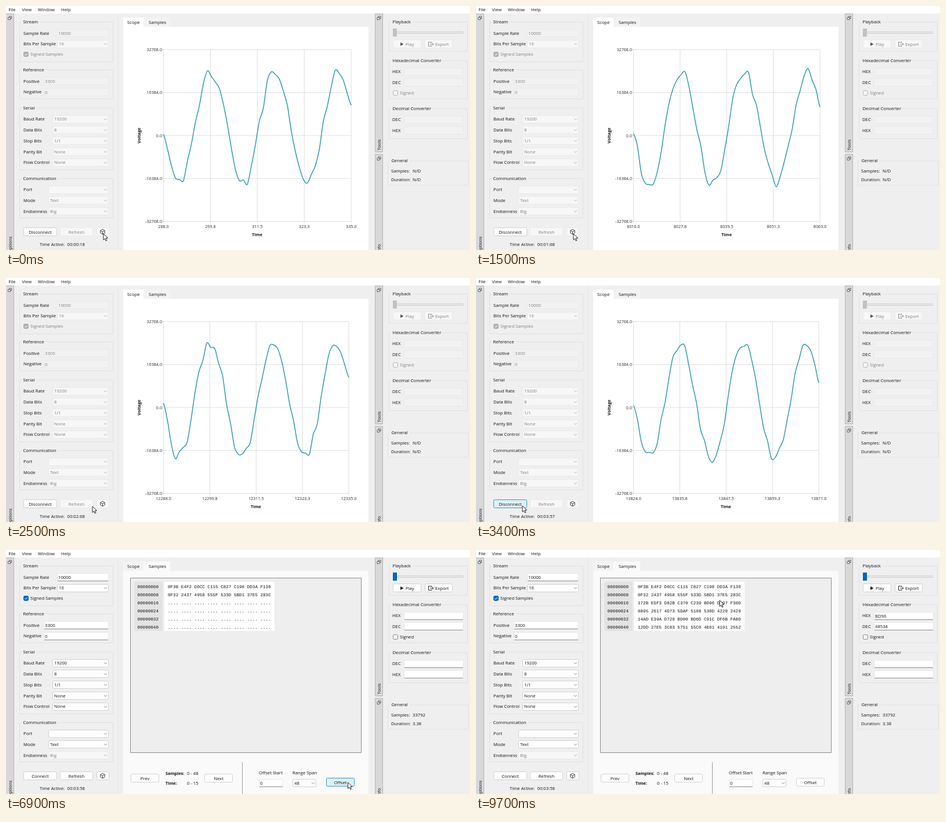
Animation, 800 px wide and 422 px high, one loop 9800 ms. Source, as an HTML page with a canvas:

```html
<!DOCTYPE html>
<html lang="en">
<head>
<meta charset="utf-8">
<title>Signal scope</title>
<style>
html, body { margin: 0; width: 100%; height: 100%; overflow: hidden; background: #efefef; }
canvas { display: block; }
</style>
</head>
<body>
<canvas id="stage" width="800" height="422"></canvas>
<script>
const g = document.getElementById('stage').getContext('2d');
const LOOP = 9800, STOP = 3500, SAMPLES_TAB = 4200, SPAN = 5600, OFFSET = 6600, LOADED = 7000, CONVERT = 8300;
const UI = '"Open Sans", "Noto Sans", sans-serif', MONO = '"Liberation Mono", monospace';
const BACK = '#efefef', INK = '#141414', DIM = '#808080', ACCENT = '#0067c0';

// time, x, y of the pointer tip
const POINTER = [[1900, 168, 394], [2500, 149, 395], [3300, 80, 394], [3800, 80, 394], [4000, 258, 29],
  [4300, 258, 29], [4800, 520, 404], [5900, 520, 404], [6500, 589.5, 402], [7000, 589.5, 402],
  [7600, 366, 90], [8500, 404, 88], [9700, 420, 87]];
// time, first sample on the scope
const START = [[0, 288], [1500, 8016], [2500, 12288], [3400, 13824]];

const HEX = [
  '0F3B E4F2 D6CC C115 C827 C198 DD3A F136',
  '0F32 2437 4958 555F 533D 5BD1 37E5 283C',
  '172B E5F3 D82B C370 C239 BD96 DD97 F30D',
  '0895 2617 4D73 5DAF 5168 530D 4220 2420',
  '14AD E39A D729 BD00 BD6D C91C DF6B FA8D',
  '12DD 27E5 3C83 5751 55C0 4E61 4191 2552'];

let live, mouse;

function at(keys, t) {
  let i = 1;
  while (i < keys.length - 1 && keys[i][0] < t) i++;
  const a = keys[i - 1], b = keys[i];
  const k = Math.min(1, Math.max(0, (t - a[0]) / (b[0] - a[0])));
  return a.slice(1).map((v, j) => v + (b[j + 1] - v) * k);
}

function random(seed) {
  return () => (seed = (seed * 16807 + 11) % 2147483647) / 2147483647;
}

function text(s, x, cy, { color = INK, size = 7.7, align = 'left', weight = 400, font = UI } = {}) {
  g.font = `${weight} ${size}px ${font}`;
  g.fillStyle = color;
  g.textAlign = align;
  g.fillText(s, x, cy + size * .355);
}

function upright(s, x, y, opts) {
  g.save();
  g.translate(x, y);
  g.rotate(-Math.PI / 2);
  text(s, 0, 0, opts);
  g.restore();
}

function fill(x, y, w, h, color) {
  g.fillStyle = color;
  g.fillRect(x, y, w, h);
}

function line(points, color, width = 1) {
  g.beginPath();
  points.forEach(([x, y]) => g.lineTo(x, y));
  g.strokeStyle = color;
  g.lineWidth = width;
  g.stroke();
}

function frame(x, y, w, h, color, width = 1) {
  g.strokeStyle = color;
  g.lineWidth = width;
  g.strokeRect(x, y, w, h);
}

function box(x, y, w, h, color, border, r = 2) {
  g.beginPath();
  g.roundRect(x + .5, y + .5, w - 1, h - 1, r);
  g.fillStyle = color;
  g.fill();
  g.strokeStyle = border;
  g.lineWidth = 1;
  g.stroke();
}

function group(title, x, y, w, h) {
  frame(x + .5, y + .5, w, h, '#e1e1e1');
  g.font = `7.7px ${UI}`;
  fill(x + 4, y - 2, g.measureText(title).width + 5, 5, BACK);
  text(title, x + 6.5, y);
}

function field(s, x, cy, w, on = !live) {
  cy = Math.round(cy);
  box(x, cy - 7, w, 14, on ? '#fff' : '#f2f2f2', on ? '#e6e6e6' : '#e9e9e9');
  if (on) fill(x + 1, cy + 6, w - 2, 1, '#8a8a8a');
  text(s, x + 2, cy, { color: on ? INK : DIM });
}

function hovered(x, y, w, h) {
  return mouse[0] >= x && mouse[0] <= x + w && mouse[1] >= y && mouse[1] <= y + h;
}

// fill and border of a clickable control
function skin(on, x, y, w, h) {
  if (!on) return ['#f7f7f7', '#eaeaea'];
  return hovered(x, y, w, h) ? ['#e0f0f8', '#3b93bf'] : ['#fdfdfd', '#d2d2d2'];
}

function combo(s, x, cy, w, on = !live) {
  const y = Math.round(cy) - 7, r = x + w - 5.5;
  box(x, y, w, 14, ...skin(on, x, y, w, 14));
  text(s, x + 3, cy, { color: on ? INK : DIM });
  line([[r - 2.5, cy - 1], [r, cy + 1.5], [r + 2.5, cy - 1]], on ? '#666' : '#a0a0a0', .8);
}

function button(s, x, cy, w, on = true, tx = x + w / 2, align = 'center') {
  const y = Math.floor(cy - 7.5);
  box(x, y, w, 15, ...skin(on, x, y, w, 15));
  text(s, tx, cy, { color: on ? INK : DIM, align });
}

function check(s, x, cy, ticked) {
  const tone = live ? '#b0b0b0' : ticked ? ACCENT : '#858585';
  box(x, cy - 4.5, 9, 9, ticked ? tone : '#f6f6f6', tone);
  if (ticked) line([[x + 2.2, cy], [x + 4, cy + 1.8], [x + 7, cy - 1.6]], '#fff');
  text(s, x + 12, cy, { color: live ? DIM : INK });
}

function dock(x, y, w, h, name, ty) {
  const cx = x + w / 2;
  fill(x, y, w, h, '#d8d8d8');
  frame(x + .5, y + .5, w - 1, h, '#b4b4b4');
  frame(cx - 1, y + 5, 4, 3.5, '#444', .8);
  fill(cx - 3, y + 7, 4, 3.5, '#eee');
  frame(cx - 3, y + 7, 4, 3.5, '#444', .8);
  upright(name, cx + .5, ty);
}

function cube(x, y) {
  const corner = i => [x + 4.3 * Math.sin(i * Math.PI / 3), y - 4.3 * Math.cos(i * Math.PI / 3)];
  line([0, 1, 2, 3, 4, 5, 6].map(corner), '#333', .9);
  [1, 3, 5].forEach(i => line([[x, y], corner(i)], '#333', .9));
}

function leftPanel(t) {
  dock(-1, 13, 15, 410, 'Options', 427);
  group('Stream', 23, 27, 161, 69);
  text('Sample Rate', 30, 47);
  field('10000', 88, 47, 89);
  text('Bits Per Sample', 30, 65.5);
  combo('16', 88, 65.5, 89);
  check('Signed Samples', 30, 83.5, true);

  group('Reference', 23, 110, 161, 50);
  text('Positive', 30, 130);
  field('3300', 65, 130, 112);
  text('Negative', 30, 148.5);
  field('0', 65, 148.5, 112);

  group('Serial', 23, 176, 161, 107);
  ['Baud Rate:19200', 'Data Bits:8', 'Stop Bits:1/1', 'Parity Bit:None', 'Flow Control:None'].forEach((row, i) => {
    const [name, v] = row.split(':'), y = 195.5 + i * 18.8;
    text(name, 30, y);
    combo(v, 80, y, 97);
  });

  group('Communication', 23, 298, 161, 68);
  ['Port:', 'Mode:Text', 'Endianness:Big'].forEach((row, i) => {
    const [name, v] = row.split(':'), y = 317.5 + i * 18.7;
    text(name, 30, y);
    combo(v, 73, y, 104, !live && i < 2);
  });

  button(live ? 'Disconnect' : 'Connect', 30, 391, 58);
  button('Refresh', 93, 391, 57, !live);
  button('', 156, 391, 22, !live);
  cube(166.5, 390.5);

  const ticks = Math.min(358, Math.round(18 + t * .0998));
  const two = n => String(n).padStart(2, '0');
  text('Time Active:', 58, 412);
  text(`00:${two(ticks / 100 | 0)}:${two(ticks % 100)}`, 105.5, 412);
}

function rightPanel(t) {
  dock(636, 13, 14, 239, 'Tools', 249.5);
  dock(636, 256, 14, 170, 'Info', 426);
  const tone = live ? DIM : INK;

  group('Playback', 660, 27, 135, 51);
  box(667, 44, 122, 4, '#e6e6e6', '#d2d2d2', 1);
  fill(667, 39, 7, 14, live ? '#c2c2c2' : ACCENT);
  button('Play', 667, 66, 49, !live, 689, 'left');
  g.fillStyle = live ? '#555' : INK;
  g.beginPath();
  g.moveTo(680, 63);
  g.lineTo(685.5, 66);
  g.lineTo(680, 69);
  g.fill();
  button('Export', 722, 66, 48, !live, 740, 'left');
  line([[734, 64], [734, 62.5], [728.5, 62.5], [728.5, 69.5], [734, 69.5], [734, 68]], tone, .9);
  line([[731, 66], [737, 66]], tone, .9);
  line([[735.3, 64.3], [737, 66], [735.3, 67.7]], tone, .9);

  const done = t >= CONVERT;
  const entry = (name, v, y) => {
    text(name, 666, y);
    field(v, 686, y, 103);
  };
  group('Hexadecimal Converter', 660, 94, 135, 66);
  entry('HEX', done ? 'BD96' : '', 113.5);
  entry('DEC', done ? '48534' : '', 132);
  check('Signed', 667, 150.5, false);
  group('Decimal Converter', 660, 177, 135, 52);
  entry('DEC', '', 196.5);
  entry('HEX', '', 215);

  group('General', 658, 267.5, 139, 42);
  text('Samples:', 664, 285.5);
  text(live ? 'N/D' : '33792', 701, 285.5);
  text('Duration:', 664, 300);
  text(live ? 'N/D' : '3.38', 701, 300);
}

// three noisy periods of 16 samples, smoothed through every sample
function trace(start, left, step) {
  const rnd = random(start * 7919 + 13);
  const ys = Array.from({ length: 48 }, (_, n) =>
    211 + 98 * Math.sin((n + .1) * Math.PI / 8) + (rnd() - .5) * 20);
  const y = n => ys[Math.min(47, Math.max(0, n))];
  const slope = n => (y(n + 1) - y(n - 1)) / 6;
  g.beginPath();
  g.moveTo(left, ys[0]);
  for (let n = 1; n < 48; n++) {
    const x = left + n * step;
    g.bezierCurveTo(x - step * 2 / 3, y(n - 1) + slope(n - 1), x - step / 3, y(n) - slope(n), x, y(n));
  }
  g.strokeStyle = '#319ab4';
  g.lineWidth = 1.5;
  g.lineJoin = 'round';
  g.stroke();
}

function scope(t) {
  const start = Math.round(at(START, t)[0] / 48) * 48;
  // longer labels leave less room on the right
  const left = 271.5, right = 601.5 - 2.1 * String(start).length, top = 75.5, bottom = 372.5;
  const small = { size: 7.2, color: '#2c2c2c' };
  for (let i = 0; i < 5; i++) {
    const x = left + (right - left) * i / 4, y = top + (bottom - top) * i / 4;
    line([[x, top], [x, bottom + 3]], '#dedede');
    line([[left - 3, y], [right, y]], '#dedede');
    text((32768 - i * 16384).toFixed(1), 269, y, { ...small, align: 'right' });
    text((Math.round((start + i * 11.75) * 10) / 10).toFixed(1), x, 381, { ...small, align: 'center' });
  }
  text('Time', (left + right) / 2 - .3, 395.5, { size: 7.3, weight: 700, align: 'center' });
  upright('Voltage', 229, 224, { size: 7.3, weight: 700, align: 'center' });
  trace(start, left, (right - left) / 47);
}

function samples(t) {
  const wide = t >= OFFSET, rows = wide ? 6 : 2, h = rows * 14 + 1;
  fill(214, 48, 399, 303, '#eee');
  frame(214.5, 48.5, 398, 302, '#8c8c8c');
  fill(221, 55, 49, h, '#e3e3e3');
  fill(273, 55, 190, h, '#fff');
  for (let i = 0; i < rows; i++) {
    const y = 63 + i * 14, words = i < 2 || t >= LOADED ? HEX[i] : HEX[i].replace(/\w/g, '.');
    text(String(i * 8).padStart(8, '0'), 226.5, y, { font: MONO, size: 7.6 });
    text(words, 279, y, { font: MONO, size: 7.6 });
  }
  button('Prev', 215, 395, 49);
  button('Next', 342, 395, 49);
  text('Samples:', 275, 386, { weight: 700, size: 7.3 });
  text(wide ? '0 - 48' : '0 - 16', 312, 386);
  text('Time:', 275, 403.5, { weight: 700, size: 7.3 });
  text(wide ? '0 - 15' : '0 - 5', 312, 403.5);
  fill(407, 367, 1, 55, '#9c9c9c');
  text('Offset Start', 436, 385.5);
  field('0', 436, 403, 42);
  text('Range Span', 494, 385.5);
  combo(t < SPAN ? '16' : '48', 494, 403, 41);
  button('Offset', 552, 402, 49);
}

function pointer([x, y]) {
  const tip = [[0, 0], [0, 10.5], [2.5, 8.2], [4.2, 12], [6, 11.2], [4.3, 7.5], [7.6, 7.3]];
  g.beginPath();
  tip.forEach(([dx, dy]) => g.lineTo(x + dx, y + dy));
  g.closePath();
  g.fillStyle = '#fff';
  g.fill();
  g.strokeStyle = '#111';
  g.lineWidth = .9;
  g.stroke();
}

function draw(t) {
  live = t < STOP;
  mouse = at(POINTER, t);
  const scoped = t < SAMPLES_TAB;
  fill(0, 0, 800, 422, BACK);
  fill(0, 0, 800, 13, '#fff');
  text('File', 4.5, 6);
  text('View', 27.5, 6);
  text('Window', 55, 6);
  text('Help', 95, 6);
  fill(192, 13, 1, 409, '#e6e6e6');

  const pane = scoped ? '#fff' : '#fafafa';
  fill(202, 36, 423, 386, pane);
  fill(202, 20, 35, 16, scoped ? pane : '#f3f3f3');
  fill(237, 20, 46, 16, scoped ? '#f3f3f3' : pane);
  text('Scope', 209, 28.5);
  text('Samples', 246, 28.5);

  leftPanel(t);
  rightPanel(t);
  (scoped ? scope : samples)(t);
  pointer(mouse);
}

function tick() {
  draw(Math.floor(performance.now() % LOOP / 100) * 100);
  requestAnimationFrame(tick);
}
tick();
</script>
</body>
</html>
```
